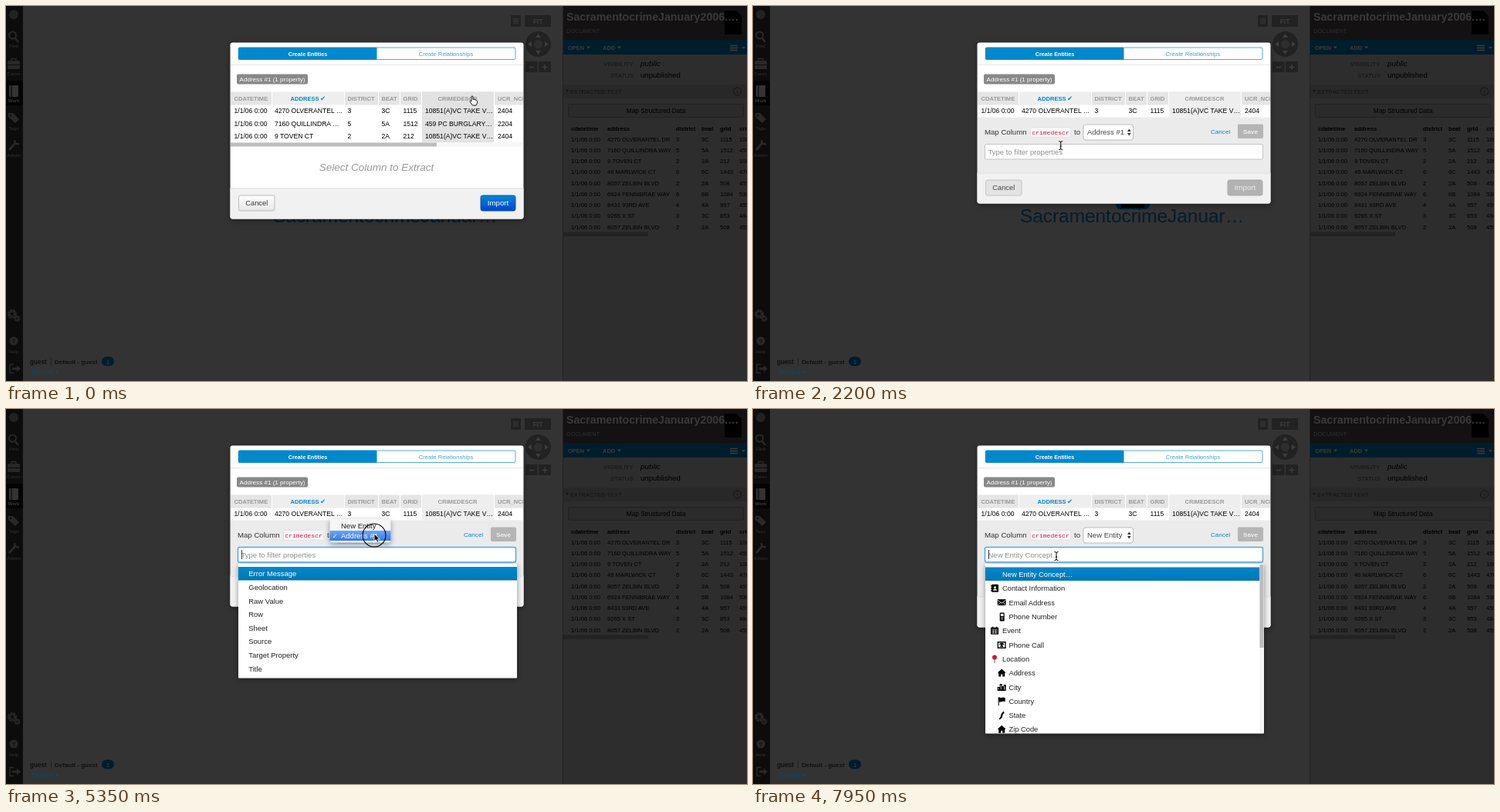
These frames come from a looping animation (960 by 487 pixels, 8 s). An HTML page:

```html
<!DOCTYPE html>
<html lang="en">
<head>
<meta charset="utf-8">
<title>Map columns</title>
<style>
  html, body { margin: 0; width: 100%; height: 100%; overflow: hidden; background: #333; }
  svg { display: block; width: 960px; height: 487px; }
  text { font-family: "Liberation Sans", Arial, sans-serif; white-space: pre; }
  .code { font-family: "Liberation Mono", "DejaVu Sans Mono", monospace; }
  .tick { font-family: "DejaVu Sans", sans-serif; }
  .b { font-weight: bold; }
  .i { font-style: italic; }
  .m { text-anchor: middle; }
  .shadow { filter: drop-shadow(0 2px 3px rgba(0,0,0,.4)); }
</style>
</head>
<body>
<svg id="stage" viewBox="0 0 960 487" xmlns="http://www.w3.org/2000/svg"></svg>
<script>
const LOOP = 8000, BLUE = '#0088cc', DIM = '#001d2c', LINK = '#004d75';

const text = (x, y, s, size, fill = '#000', cls = '') =>
  `<text x="${x}" y="${y}" font-size="${size}" fill="${fill}" class="${cls}">${s}</text>`;
const rect = (x, y, w, h, fill, extra = '') =>
  `<rect x="${x}" y="${y}" width="${w}" height="${h}" fill="${fill}" ${extra}/>`;
const path = (d, fill, extra = '') => `<path d="${d}" fill="${fill}" ${extra}/>`;
const line = (d, color, w = 1) => path(d, 'none', `stroke="${color}" stroke-width="${w}"`);
const group = (id, body, extra = '') => `<g id="${id}" ${extra}>${body}</g>`;
const at = (x, y, body) => `<g transform="translate(${x} ${y})">${body}</g>`;
const circle = (x, y, r, fill, extra = '') => `<circle cx="${x}" cy="${y}" r="${r}" fill="${fill}" ${extra}/>`;
const gradient = (id, a, b) =>
  `<linearGradient id="${id}" x2="0" y2="1"><stop stop-color="${a}"/><stop offset="1" stop-color="${b}"/></linearGradient>`;

const defs = `<defs>
  ${gradient('plain', '#fff', '#e6e6e6')}${gradient('primary', '#0088cc', '#0044cc')}
  ${gradient('pick', BLUE, '#0077b3')}${gradient('menu', '#6ea7f5', '#3477ea')}
  <clipPath id="inModal"><rect x="291" y="77" width="379" height="120"/></clipPath></defs>`;

function sidebar() {
  const c = '#282828', bg = '#0c0c0c';
  const label = (y, s, fill = c) => text(10, y, s, 5.8, fill, 'm b');
  return rect(0, 0, 22, 487, bg) + circle(10, 11, 6, '#222') +
    circle(8.5, 38, 4.5, 'none', `stroke="${c}" stroke-width="2"`) + line('M12 42l4 5', c, 2.5) + label(54, 'Find') +
    rect(2, 71, 16, 11, c, 'rx="1.5"') + line('M7 71v-2.500h6v2.500', c, 1.5) + line('M2 76.500h16', bg) + label(90, 'Cases') +
    rect(0, 97, 22, 32, '#040404') + rect(4, 103, 12, 15, '#333', 'rx="1"') + line('M7 103v15', '#000') + label(125, 'Work', '#3a3a3a') +
    path('M3 139h6l8 8-5 5-9-8z', c) + circle(6, 142, 1.2, bg) + label(161, 'Tags') +
    line('M4 187l8-9', c, 3) + line('M11 174c0 4 2 6 6 5', c, 2.5) + label(196, 'Admin') +
    circle(8, 400, 4, 'none', `stroke="${c}" stroke-width="4" stroke-dasharray="2.6 .6"`) +
    circle(14.5, 406, 2.5, 'none', `stroke="${c}" stroke-width="3" stroke-dasharray="2 .5"`) +
    circle(10, 435, 5.5, c) + text(10, 438, '?', 8, bg, 'b m') + label(451, 'Help') +
    line('M10 465.500h-5v11h5', c, 1.5) + line('M8 471h7', c, 3) + path('M14 466.500l5 4.500-5 4.500z', c);
}

function graph() {
  const ctl = '#222', ink = '#3d3d3d';
  return rect(654, 12, 13, 15, ctl) + line('M657 17h7M657 19.500h7M657 22h7', ink) +
    rect(672, 12, 34, 15, ctl) + text(689, 23, 'FIT', 8.5, ink, 'b m') +
    circle(689.5, 49.5, 16.5, ctl) + circle(689.5, 49.5, 5.5, '#2e2e2e') +
    path('M689.500 36l3.500 5h-7zM689.500 63l3.500-5h-7zM676 49.500l5-3.500v7zM703 49.500l-5-3.500v7z', ink) +
    rect(673, 72, 15.5, 14, ctl) + rect(690, 72, 16, 14, ctl) + line('M678 79.500h6M694.500 79.500h7M698 76v7', ink, 1.4) +
    rect(470, 215, 44, 49, DIM, 'rx="6"') + rect(477, 220, 30, 42, '#000') +
    text(491, 281, 'SacramentocrimeJanuar…', 24.4, DIM, 'm') +
    text(31, 465, 'guest', 8.2, '#111', 'b') + line('M58.500 457v10', '#222') +
    text(63, 465, 'Default - guest', 8, '#111', 'b') +
    rect(124, 455.5, 16, 12, DIM, 'rx="6"') + text(132, 464.5, '1', 7.5, '#444', 'm') +
    text(32, 478, 'Timeline', 8, LINK) + path('M64 474h4l-2 3z', LINK);
}

const people = [
  ['4270 OLVERANTEL DR', '3', '3C', 1115, 108], ['7160 QUILLINDRA WAY', '5', '5A', 1512, 459],
  ['9 TOVEN CT', '2', '2A', 212, 108], ['46 MARLWICK CT', '6', '6C', 1443, 476],
  ['8057 ZELBIN BLVD', '2', '2A', 508, 459], ['6924 FENNIBRAE WAY', '6', '6B', 1084, 530],
  ['8431 93RD AVE', '4', '4A', 957, 459], ['9265 X ST', '3', '3C', 853, 484],
  ['8057 ZELBIN BLVD', '2', '2A', 508, 459]];

function detail() {
  const cols = [732, 779, 868, 901, 925, 950], ink = '#3c3c3c';
  const cells = (vals, y, cls = '') => vals.map((v, i) => text(cols[i], y, v, 7.6, '#000', cls)).join('');
  return rect(721, 0, 239, 487, '#2d2d2d') + rect(721, 0, 1, 487, '#222') + rect(722, 0, 238, 44, '#131112') +
    path('M931 6h15l7 7v24h-22z', '#000') +
    text(726, 18.5, 'SacramentocrimeJanuary2006.…', 14.2, '#3a3a3a', 'b') +
    text(726, 35, 'DOCUMENT', 7.5, '#303030') +
    rect(722, 44, 238, 19, DIM) +
    text(728, 57, 'OPEN', 7.5, ink, 'b') + path('M752 52.500h5l-2.500 3z', ink) +
    text(773, 57, 'ADD', 7.5, ink, 'b') + path('M792 52.500h5l-2.500 3z', ink) +
    line('M938 51.500h10M938 54.500h10M938 57.500h10', ink, 1.3) + path('M953 53h5l-2.500 3z', ink) +
    text(774, 78, 'VISIBILITY', 7.8, '#151515') + text(822, 78, 'public', 9.9, '#000', 'i') +
    text(783, 93, 'STATUS', 7.8, '#151515') + text(822, 93, 'unpublished', 9.6) +
    rect(722, 102, 238, 18, '#282828') + path('M725 109h4l-2 3z', '#151515') +
    text(731, 114, 'EXTRACTED TEXT', 7.5, '#151515') +
    circle(947.5, 111, 5, 'none', 'stroke="#151515"') + text(947.5, 114, 'i', 8, '#151515', 'm') +
    rect(728.5, 127.5, 227, 17, '#2b2b2b', 'rx="2" stroke="#222"') + text(842, 138.5, 'Map Structured Data', 8.3, '#000', 'm') +
    cells(['cdatetime', 'address', 'district', 'beat', 'grid', 'crimedescr'], 161.5, 'b') +
    people.map((p, i) => cells(['1/1/06 0:00', ...p], 175.7 + i * 14.25)).join('') +
    rect(722, 293.5, 110, 5.5, '#232323');
}

// Table inside the dialog
const colX = [291, 345, 439, 483, 511, 539, 633, 690];
const heads = ['CDATETIME', '', 'DISTRICT', 'BEAT', 'GRID', 'CRIMEDESCR', 'UCR_NCIC'];
const tableRow = (vals, y) => vals.map((v, i) =>
  text([295.5, 348, 442.5, 486.5, 514.5, 543, 637][i], y, v, 8.6)).join('');

function table() {
  const head = heads.map((h, i) => rect(colX[i], 111.5, colX[i + 1] - colX[i] - 1, 17, i === 1 ? '#eee' : '#e5e5e5')).join('');
  return group('table', head +
    group('column', rect(539, 111.5, 93, 33, '#e8e8e8', 'id="columnBg"')) +
    heads.map((h, i) => text([295.5, 0, 442.5, 486.5, 514.5, 559.5, 637][i], 122.8, h, 7.6, '#999', 'b')).join('') +
    text(368.5, 122.8, 'ADDRESS', 7.6, BLUE, 'b') + text(407, 123, '✔', 8.5, BLUE, 'tick') +
    tableRow(['1/1/06 0:00', '4270 OLVERANTEL …', '3', '3C', '1115', '10851(A)VC TAKE V…', '2404'], 139.2) +
    group('rows',
      tableRow(['1/1/06 0:00', '7160 QUILLINDRA …', '5', '5A', '1512', '459 PC BURGLARY…', '2204'], 155.6) +
      tableRow(['1/1/06 0:00', '9 TOVEN CT', '2', '2A', '212', '10851(A)VC TAKE V…', '2404'], 171.9) +
      rect(291, 177, 379, 6, '#f7f7f7') + rect(291, 177.5, 267, 5, '#bdbdbd')), 'clip-path="url(#inModal)"');
}

const button = (x, w, s, fill, stroke, ink, size) =>
  rect(x + .5, 9.5, w - 1, 20, fill, `rx="2.5" stroke="${stroke}"`) + text(x + w / 2, 22.8, s, size, ink, 'm');
const arrows = path('M485 163l2.300-3.500 2.300 3.500zM485 165l2.300 3.500 2.300-3.500z', '#333');

function form() {
  return rect(291, 144.5, 379, 71.5, '#ebebeb', 'id="formBg"') +
    text(300, 166.8, 'Map Column', 9.65, '#333') +
    rect(359.5, 157.5, 52, 13, '#f7f7f9', 'rx="2" stroke="#e1e1e8"') + text(361.2, 167, 'crimedescr', 8.1, '#dd1144', 'code') +
    text(416, 166.8, 'to', 9.65, '#333') +
    rect(428, 154, 64.5, 20, '#fff', 'id="select" rx="3"') + text(433, 167.3, '', 9.5, '#444', 'choice') + arrows +
    text(593, 165.5, 'Cancel', 8.1, BLUE) + rect(628, 153.5, 33, 18.5, '#b5b5b5', 'rx="2"') + text(644.5, 165.7, 'Save', 8.1, '#eee', 'b m') +
    rect(300.5, 179.5, 360, 19.5, '#fff', 'id="input" rx="2"') + text(304.5, 192.6, '', 9.5, '#8f8f8f', 'hint') +
    group('caret', rect(305, 183, .8, 12, '#000'));
}

function propertyList() {
  const items = ['Error Message', 'Geolocation', 'Raw Value', 'Row', 'Sheet', 'Source', 'Target Property', 'Title'];
  return group('props', rect(301, 201, 361, 148.5, '#fff', 'rx="1" class="shadow"') + rect(301, 205, 361, 17.5, 'url(#pick)') +
    items.map((s, i) => text(314.3, 217.2 + i * 17.65, s, 9.45, i ? '#222' : '#fff')).join(''));
}

const icons = {
  book: rect(1, 0, 9, 10, '#000', 'rx="1"') + circle(5.5, 4, 1.5, '#fff') + path('M3 8c1-3 4-3 5 0z', '#fff') + line('M0 2h2M0 5h2M0 8h2', '#000'),
  mail: rect(0, 1, 11, 8, '#000') + line('M0 2l5.500 4 5.500-4M0 9l4-4M11 9l-4-4', '#fff', .8),
  phone: rect(3, 0, 6, 11, '#000', 'rx="1"') + rect(4.2, 1.5, 3.6, 3, '#fff') + line('M4.500 6.500h3M4.500 8.500h3', '#fff', .8),
  date: rect(0, 1, 10, 9, '#000') + line('M2.500 0v2M7.500 0v2', '#000', 1.5) + line('M1 3.500h8M1 6h8M1 8.200h8M3.500 4v5M6.500 4v5', '#fff', .6),
  call: rect(0, 1, 11, 9, '#000') + rect(1.3, 2.5, 8.4, 6, '#fff') + path('M2 5c2-3 5-3 7 0zM3.500 8l1-3h2l1 3z', '#000'),
  pin: line('M5 5v6', '#666') + circle(5, 3.2, 3, '#d2143a'),
  home: path('M5.500 0l5.500 5h-1.500v5h-3v-3h-2v3h-3v-5h-1.500z', '#000'),
  city: path('M0 10v-5h3v-4h3v3h2v-2h3v8z', '#000') + line('M4.500 2.500v6M1.500 6.500v2M9 4v5', '#fff', .8),
  flag: path('M1 0h1c3 2 5-1 8 1v5c-3-1.500-5 1-8 0v5h-1z', '#000'),
  state: path('M8 0l1 2-2 2-1 4-3 3-1-1 2-3 1-4z', '#000'),
};

function conceptList() {
  const items = [['New Entity Concept…', 0], ['Contact Information', 0, 'book'], ['Email Address', 1, 'mail'],
    ['Phone Number', 1, 'phone'], ['Event', 0, 'date'], ['Phone Call', 1, 'call'], ['Location', 0, 'pin'], ['Address', 1, 'home'],
    ['City', 1, 'city'], ['Country', 1, 'flag'], ['State', 1, 'state'], ['Zip Code', 1, 'home']];
  return group('concepts', rect(301, 201, 361, 220.5, '#fff', 'rx="1" class="shadow"') +
    rect(301, 205.5, 355.5, 17.5, 'url(#pick)') + rect(656.5, 201.5, 5, 219.5, '#f3f3f3') + rect(656.5, 202, 5, 108, '#bbb') +
    items.map(([s, deep, icon], i) => {
      const y = 214.8 + i * 18.3;
      return (icon ? at(308 + deep * 8.7, y - 5.3, icons[icon]) : '') + text(323 + deep * 8.5, y + 3.3, s, 9.3, i ? '#222' : '#fff');
    }).join(''));
}

function popup() {
  return group('popup', rect(419.5, 142.5, 79, 31, '#f6f6f6', 'rx="4" class="shadow"') +
    rect(419.5, 0, 79, 13, 'url(#menu)', 'id="menuBar"') +
    text(434, 154.8, 'New Entity', 9.5, '#222', 'menu0') + text(434, 167.6, 'Address #1', 9.5, '#222', 'menu1') +
    text(422.5, 167.6, '✓', 8.5, '#222', 'tick menu1'));
}

const edge = 'stroke="#fff" stroke-width=".9" stroke-linejoin="round"';
const cursors = group('cursor',
  group('arrow', path('M0 0v9.600l2.300-2 1.700 3.800 1.900-.8-1.700-3.700h3.100z', '#000', edge)) +
  group('beam', line('M-2.500-5.500q2.500 0 2.500 1.500 0-1.500 2.500-1.500M0-4v8M-2.500 5.500q2.500 0 2.500-1.500 0 1.500 2.500 1.500M-1 1h2', '#000', 1)) +
  group('hand', path('M-1 1c0-1.500 2-1.500 2 0v3.500c1-.8 2-.5 2 .4 1-.6 2-.2 2 .6 1-.3 1.500.2 1.500 1v2.500l-1.500 3h-4.500l-3.500-4.500c-.5-1 .7-1.800 2-.5z', '#fff', 'stroke="#000" stroke-width=".9"')) +
  group('ring', circle(0, 2, 15, 'none', 'stroke="#000" stroke-width="1.1"')));

const stage = document.getElementById('stage');
stage.innerHTML = defs + rect(0, 0, 960, 487, '#333') + graph() + sidebar() + detail() +
  rect(290.5, 47.5, 380, 229, '#fff', 'id="modal" rx="3" class="shadow"') +
  rect(291, 76, 379, 1, '#e8e8e8') +
  rect(301.3, 54, 358.7, 15.5, '#fff', `rx="2" stroke="${BLUE}" stroke-width=".7"`) + rect(301, 53.7, 179.5, 16.1, BLUE, 'rx="1.5"') +
  text(391, 64.5, 'Create Entities', 7.2, '#fff', 'm b') + text(570, 64.5, 'Create Relationships', 7.6, '#4a9fcf', 'm') +
  rect(299, 88.5, 92, 13, '#888', 'rx="2"') + text(345, 98, 'Address #1 (1 property)', 8.1, '#fff', 'm') +
  table() + group('prompt', text(480, 0, 'Select Column to Extract', 13.5, '#999', 'm i')) +
  group('form', form()) +
  group('footer', path('M290.500 0h380v37q0 3-3 3h-374q-3 0-3-3z', '#f1f1f1') + rect(290.5, 0, 380, 1, '#dedede') +
    group('ready', button(301, 47.5, 'Cancel', 'url(#plain)', '#bbb', '#333', 9.3) + button(614.5, 46, 'Import', 'url(#primary)', '#0055bb', '#fff', 9.7)) +
    group('busy', button(301, 47.5, 'Cancel', '#e3e3e3', '#c4c4c4', '#444', 9.3) + button(614.5, 46, 'Import', '#b2b2b2', '#aaa', '#eee', 9.7))) +
  propertyList() + conceptList() + popup() + cursors;

const el = id => document.getElementById(id);
const set = (node, attrs) => Object.entries(attrs).forEach(([k, v]) => node.setAttribute(k, v));
const show = (id, on) => set(el(id), { visibility: on ? 'visible' : 'hidden' });
const put = (cls, s) => { stage.querySelector('.' + cls).textContent = s; };
const within = (t, a, b) => t >= a && t < b;

const FOLD = 600, FORM = 800, OPEN = 2550, POPUP = 5200, BLUR = 5450, PICK = 6300, ENTITY = 6500, FOCUS = 6950;
const moves = [[0, 604, 117], [900, 604, 117], [1600, 399, 180], [2150, 399, 180], [2450, 395, 195], [3900, 395, 195],
  [4900, 477, 162], [5750, 477, 162], [6100, 472, 152], [6500, 472, 152], [6900, 393, 191], [LOOP, 393, 191]];
const clicks = [400, 2450, 5220, 6150, 6900];

function pointer(t) {
  const i = moves.findIndex(m => m[0] > t);
  const [t0, x0, y0] = moves[i - 1], [t1, x1, y1] = moves[i];
  const p = (t - t0) / (t1 - t0), e = p * p * (3 - 2 * p);
  return [x0 + (x1 - x0) * e, y0 + (y1 - y0) * e];
}

function draw(t) {
  const mapping = t >= FORM, entity = t >= ENTITY;
  const bottom = t < FOLD ? 276.5 : !mapping ? 238.5 : entity ? 283.5 : 256.5;
  const props = within(t, OPEN, BLUR), focused = props || t >= FOCUS;

  set(el('modal'), { height: bottom - 47.5 });
  set(el('footer'), { transform: `translate(0 ${bottom - 40})` });
  set(el('formBg'), { height: bottom - 184.5 });
  set(el('prompt'), { transform: `translate(0 ${bottom - 62.5})` });
  set(el('columnBg'), { height: t < FOLD ? 65.5 : 33, fill: mapping ? '#eee' : '#e2e2e2' });
  show('rows', t < FOLD);
  show('prompt', !mapping);
  show('form', mapping);
  show('ready', !mapping);
  show('busy', mapping);
  show('props', props);
  show('concepts', t >= FOCUS + 100);

  put('choice', entity ? 'New Entity' : 'Address #1');
  put('hint', entity ? 'New Entity Concept…' : t >= BLUR ? 'Choose Property...' : 'Type to filter properties');
  set(el('input'), { stroke: focused ? '#52a8ec' : '#c4c4c4', 'stroke-width': focused ? 1.5 : 1 });
  set(el('select'), { stroke: within(t, BLUR, FOCUS) ? '#52a8ec' : '#bbb' });
  const blink = (props ? t - 300 : t - FOCUS) % 1000 < 500;
  show('caret', focused && blink);

  const onNew = t >= 5950;
  show('popup', within(t, POPUP, ENTITY));
  set(el('popup'), { opacity: t < PICK ? 1 : 1 - (t - PICK) / (ENTITY - PICK) });
  set(el('menuBar'), { y: onNew ? 145 : 158 });
  stage.querySelectorAll('.menu0').forEach(n => set(n, { fill: onNew ? '#fff' : '#222' }));
  stage.querySelectorAll('.menu1').forEach(n => set(n, { fill: onNew ? '#222' : '#fff' }));

  const [x, y] = pointer(t);
  const hand = t < FOLD, beam = mapping && y > 178;
  set(el('cursor'), { transform: `translate(${x} ${y})` });
  show('hand', hand);
  show('beam', beam);
  show('arrow', !hand && !beam);
  show('ring', clicks.some(c => within(t, c, c + 190)));
}

function tick() {
  draw(performance.now() % LOOP);
  requestAnimationFrame(tick);
}
tick();
</script>
</body>
</html>
```
